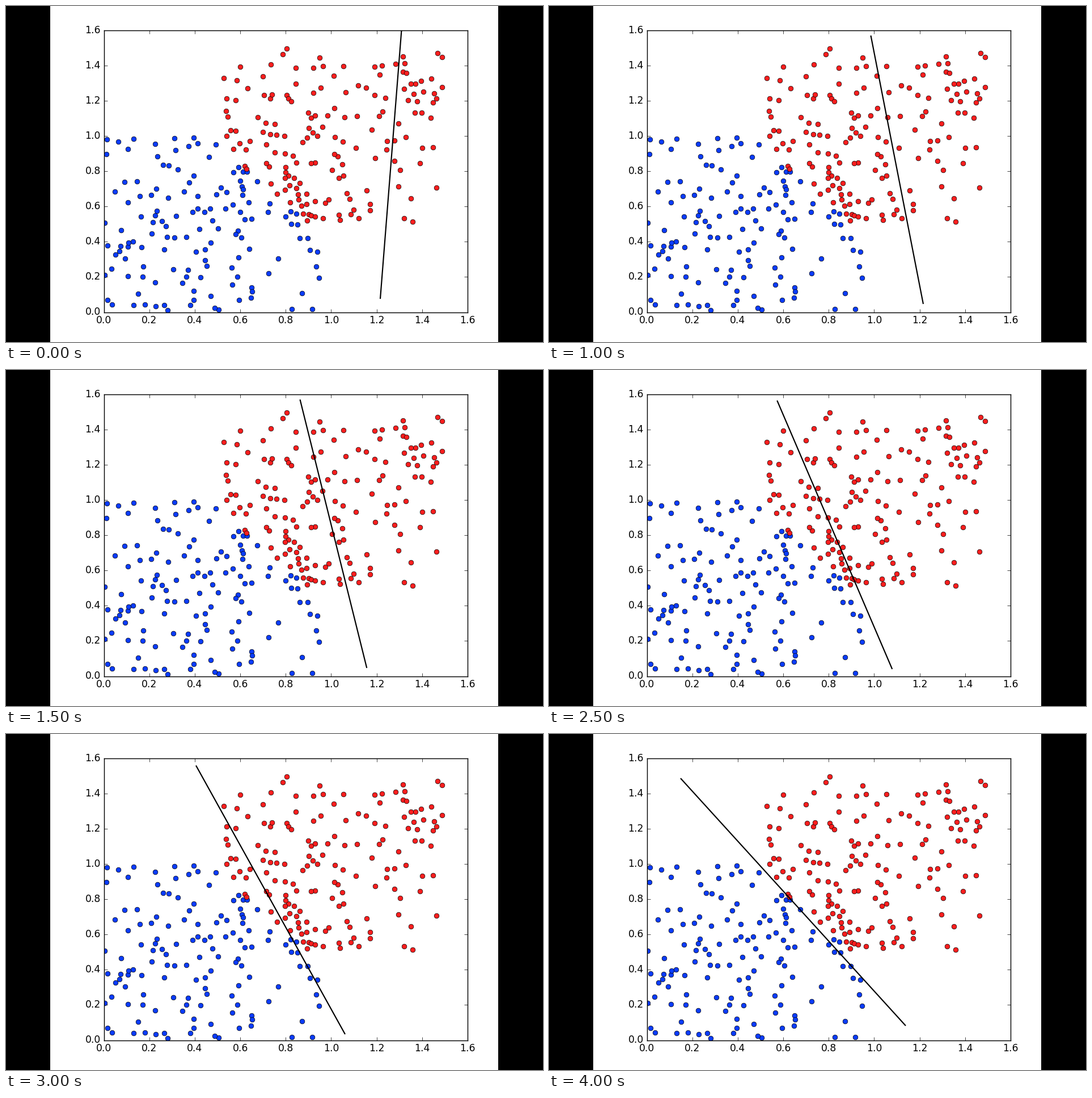
A matplotlib script for the animation above (6 s loop, 947x592 px).

```python
import random

import numpy as np
import matplotlib.pyplot as plt
from matplotlib.animation import FuncAnimation
from matplotlib.patches import Rectangle

W, H, DPI = 947, 592, 100
LEFT, RIGHT, TOP, BOTTOM = 172.5, 814.0, 43.0, 539.5
SPAN = 1.6
PX, PY = (RIGHT - LEFT) / SPAN, (BOTTOM - TOP) / SPAN
SCALE = 1.035
BLUE, RED = "#0a3cff", "#ff1e1e"

# Points along the border between the classes, in stage pixels.
BLUE_EDGE = [
    (370, 244), (401, 293), (410, 284), (418, 292), (425, 292), (413, 308),
    (416, 318), (418, 323), (417, 333), (443, 309), (428, 346), (465, 348),
    (493, 371), (502, 362), (512, 366), (503, 384), (514, 385), (518, 409),
    (532, 409), (536, 430), (549, 433), (547, 459), (552, 479),
]
RED_EDGE = [
    (384, 127), (389, 163), (388, 185), (396, 219), (389, 229), (412, 242),
    (401, 252), (423, 253), (421, 282), (424, 287), (467, 313), (478, 331),
    (501, 346), (516, 341), (515, 332), (521, 352), (530, 349), (531, 378),
    (534, 367), (538, 369), (545, 371), (587, 368), (589, 377), (622, 374),
    (642, 360),
]

# How many further points fall in each 0.2 x 0.2 cell, top row first.
BLUE_CELLS = ["5 9 2 0 0", "5 6 5 0 0", "4 11 9 5 0", "13 4 8 3 0", "5 8 6 3 3"]
RED_CELLS = ["2 5 5 4 8", "4 8 8 7 14", "2 10 6 6 3", "0 13 8 3 3", "0 3 8 2 3"]

# Separator: step, upper end, lower end.
LINE_KEYS = np.array([
    (0, 697.7, 40, 660, 516),
    (1, 632, 52, 662, 525),
    (2, 567.5, 52, 660, 525),
    (4, 469.5, 52, 612.5, 525),
    (6, 335, 55.5, 598, 529),
    (7, 236, 68.5, 642, 530),
    (8, 232, 78, 629, 514),
])


def to_data(x, y):
    return (np.asarray(x) - LEFT) / PX, (BOTTOM - np.asarray(y)) / PY


def below_border(x, y):
    return y - 78 - (x - 232) * 1.098


def scatter_cells(cells, x0, y0, edge, side, rng):
    """Fill the cells at random, keeping to one side of the border."""
    points = list(edge)
    cw, ch = 0.2 * PX, 0.2 * PY
    for row, line in enumerate(cells):
        for col, count in enumerate(map(int, line.split())):
            placed = tries = 0
            while placed < count and tries < 500:
                tries += 1
                x = x0 + (col + rng.random()) * cw
                y = y0 + (row + rng.random()) * ch
                clear = all((x - a) ** 2 + (y - b) ** 2 > 49 for a, b in points)
                if clear and side * below_border(x, y) > 8:
                    points.append((x, y))
                    placed += 1
    return np.array(points)


rng = random.Random(7)
blue = scatter_cells(BLUE_CELLS, LEFT, BOTTOM - PY, BLUE_EDGE, 1, rng)
red = scatter_cells(RED_CELLS, LEFT + 0.5 * PX, BOTTOM - 1.5 * PY,
                    RED_EDGE, -1, rng)

fig = plt.figure(figsize=(W / DPI, H / DPI), dpi=DPI, facecolor="black")
fig.add_artist(Rectangle((78 / W, 0), 790 / W, 1, color="white", lw=0,
                         zorder=-1))
ax = fig.add_axes([LEFT / W, 1 - BOTTOM / H, (RIGHT - LEFT) / W,
                   (BOTTOM - TOP) / H])
ax.set(xlim=(0, SPAN), ylim=(0, SPAN))

ticks = np.arange(9) * 0.2
labels = [f"{t:.1f}" for t in ticks]
ax.set_xticks(ticks, labels, family="DejaVu Sans")
ax.set_yticks(ticks, labels, family="DejaVu Sans", va="center")
ax.tick_params(direction="in", top=True, right=True, length=4 * SCALE,
               width=0.5 * SCALE, pad=4 * SCALE, labelsize=12 * SCALE)
for spine in ax.spines.values():
    spine.set_linewidth(SCALE)

for points, color in ((blue, BLUE), (red, RED)):
    ax.plot(*to_data(*points.T), "o", color=color, ms=6 * SCALE,
            mec="black", mew=0.5 * SCALE)

separator, = ax.plot([], [], color="black", lw=1.5 * SCALE, zorder=5,
                     solid_capstyle="butt")


def update(step):
    x1, y1, x2, y2 = (np.interp(step, LINE_KEYS[:, 0], LINE_KEYS[:, k])
                      for k in range(1, 5))
    separator.set_data(*to_data([x1, x2], [y1, y2]))
    return separator,


anim = FuncAnimation(fig, update, frames=12, interval=500, repeat=True)
plt.show()
```
